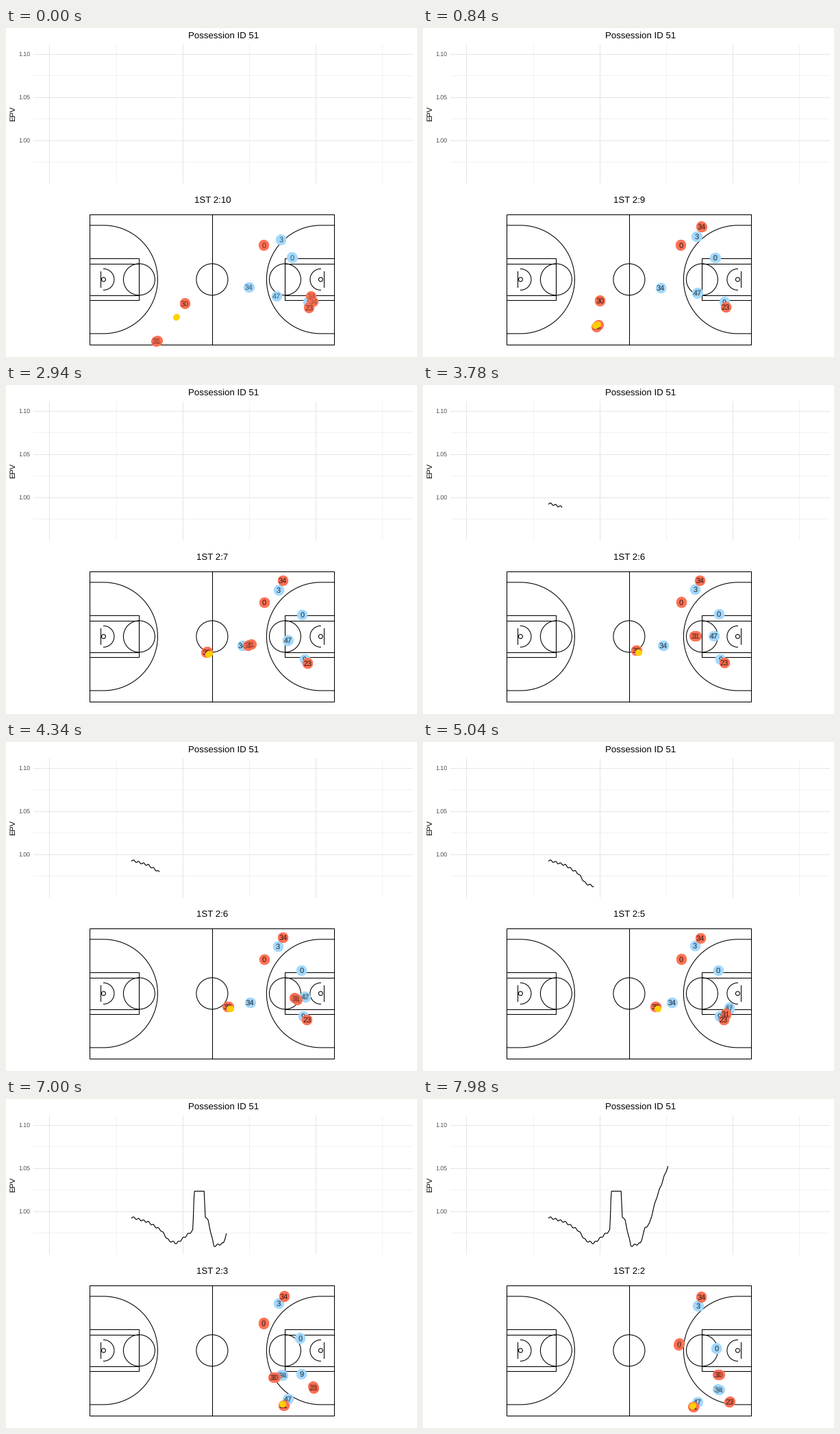
Write a matplotlib script that moves like this. It is 600 px wide and 480 px high and loops after 8000 ms.

```python
import math
import numpy as np
import matplotlib.pyplot as plt
from matplotlib.animation import FuncAnimation
from matplotlib.patches import Circle, Rectangle

W, H, DPI = 600, 480, 100
LOOP, TICK, HOLD = 8000, 40, 140   # loop, redraw interval, time one pose stays (ms)
SAMPLE = 42                        # spacing of the overlaid tracking samples (ms)
RED, BLUE, GOLD = "#FF7256", "#A3D9FF", "#FFD000"
PX = 72 / DPI

plt.rcParams["font.family"] = "Liberation Sans"
plt.rcParams["text.hinting"] = "no_hinting"
fig = plt.figure(figsize=(W / DPI, H / DPI), dpi=DPI, facecolor="white")
ax = fig.add_axes([0, 0, 1, 1])
ax.set_xlim(0.6, W + 0.6)   # half a pixel, so that lines snap to the right one
ax.set_ylim(H + 0.5, 0.5)
ax.axis("off")


def label(x, y, s, size, **kw):
    kw = {"ha": "center", "va": "baseline", "color": "black", **kw}
    return ax.text(x, y, s, fontsize=size * PX, **kw)


def line(xs, ys, width=1.07, color="black", **kw):
    return ax.plot(xs, ys, color=color, lw=width * PX, **kw)[0]


def outline(patch):
    patch.set(fill=False, edgecolor="black", linewidth=1.07 * PX, zorder=1)
    ax.add_patch(patch)


# chart: grid lines alternate between major and minor
for k in range(6):
    x, y = 64 + 97.1 * k, 38.5 + 31.4 * k
    width = 0.55 if k % 2 else 1.07
    line([x, x], [24, 226], width, "#E6E6E6", zorder=0)
    line([41, 594], [y, y], width, "#E6E6E6", zorder=0)
    if k % 2 == 0:
        label(36.4, y + 3.3, f"{1.1 - 0.025 * k:.2f}", 8.8, ha="right", color="#4D4D4D")
label(11, 125, "EPV", 11, rotation=90, va="center")
label(317.8, 15.6, "Possession ID 51", 13.2)
clock = label(301.9, 255.5, "", 13.2)

# court
MID = np.array([301.5, 367.4])
HOOP = MID + [158.5, 0]
outline(Rectangle(MID - [178.5, 95], 357, 190))
line([MID[0]] * 2, [MID[1] - 95, MID[1] + 95])
outline(Circle(MID, 23))
turn = np.linspace(-math.pi / 2, math.pi / 2, 90)
for side in (-1, 1):
    def trace(dx, dy):
        line(MID[0] + side * np.array(dx), MID[1] + np.array(dy))

    for half in (30.5, 22.7):
        trace([178.5, 106.5, 106.5, 178.5], [-half, -half, half, half])
    outline(Circle(MID + [side * 106.5, 0], 23))
    outline(Circle(MID + [side * 158.5, 0], 3))
    trace([163, 163], [-11.5, 11.5])
    trace(158.5 - 15.5 * np.cos(turn), 15.5 * np.sin(turn))
    trace([178.5, *(158.5 - 79 * np.cos(turn)), 178.5], [-79, *(79 * np.sin(turn)), 79])


def path(*keys):
    """Smooth monotone path through a few (ms, x, y) points."""
    k = np.array(keys, float)
    ts, pts = k[:, 0], k[:, 1:]
    gap = np.diff(ts)
    slope = np.diff(pts, axis=0) / gap[:, None]
    a, b = slope[:-1], slope[1:]
    inner = np.where(a * b > 0, 2 * a * b / np.where(a * b > 0, a + b, 1), 0)
    vel = np.vstack([1.5 * slope[0] - 0.5 * inner[0], inner,
                     1.5 * slope[-1] - 0.5 * inner[-1]])

    def at(t):
        i = np.clip(np.searchsorted(ts, t, side="right") - 1, 0, len(gap) - 1)
        d, u = gap[i], (t - ts[i]) / gap[i]
        v = 1 - u
        return ((1 + 2 * u) * v * v * pts[i] + u * v * v * d * vel[i]
                + (3 - 2 * u) * u * u * pts[i + 1] - u * u * v * d * vel[i + 1])
    return at


REDS = {
    "0": path((0, 377, 317), (6200, 377.3, 317), (7980, 374, 358)),
    "30": path((0, 261.5, 402), (840, 259, 398), (1960, 275, 393),
               (5040, 340, 386), (6160, 364, 407.5), (7980, 432, 402.5)),
    "31": path((0, 220.5, 457), (1960, 304, 407), (3780, 398, 366),
               (5040, 442.5, 397.5), (6160, 417, 443.5), (7980, 395.5, 449.5)),
    "34": path((0, 447.5, 395.5), (840, 407, 290), (1960, 404.5, 285), (7980, 407, 289)),
    "23": path((0, 443, 408), (6160, 439.5, 405), (7500, 453.5, 434), (7980, 448, 442)),
}


def guard(t):
    """Stays between 31 and the hoop, closing in on the runner."""
    spot = REDS["31"](t)
    return spot + (HOOP - spot) * (0.41 + 0.32 * math.cos(math.pi * t / LOOP))


BLUES = {
    "3": path((0, 402, 309), (1960, 398.5, 300.5), (6160, 397.5, 297.5), (7980, 402, 302)),
    "0": path((0, 418, 335), (1960, 433, 336), (5040, 431.5, 333.5), (7980, 429, 364)),
    "34": path((0, 355, 378.5), (1960, 342.5, 380.5), (5040, 364, 380.5), (7980, 432, 424)),
    "47": guard,
    "9": path((0, 442, 400), (5040, 433.5, 400), (7980, 431.5, 402.5)),
}


def ball_at(t):
    """The ball is held by 30 or 31, or flies between them."""
    share = np.interp(t, [0, 750, 1150, 1500, 5700, 6330], [0.33, 1, 1, 0, 0, 1])
    return ((1 - share) * (REDS["30"](t) + [3, 3])
            + share * (REDS["31"](t) + [-1.5, -1.5]))


def dots(color, diameter, z):
    return ax.scatter([], [], s=(diameter * PX) ** 2, c=color, linewidths=0, zorder=z)


class Team:
    def __init__(self, players, color, z):
        self.players = players
        self.dots = dots(color, 15.2, z)
        self.tags = {n: [label(0, 0, n, 11, alpha=0.35, zorder=z + 1) for _ in range(3)]
                     for n in players}

    def move(self, times):
        spots = []
        for n, at in self.players.items():
            here = [at(t) for t in times]
            spots += here
            for k, tag in enumerate(self.tags[n]):
                tag.set_visible(k < len(here))
                if k < len(here):
                    tag.set_position((here[k][0], here[k][1] + 4))
        self.dots.set_offsets(spots)


teams = [Team(BLUES, BLUE, 3), Team(REDS, RED, 5)]
ball = dots(GOLD, 9, 8)

# expected value: a rough course with a ripple, flat while the ball is passed
COURSE = np.array([
    (184, 173), (208, 180), (227, 192), (238, 207), (250, 211), (273.5, 192),
    (275.3, 135), (290, 135), (291.3, 171), (296, 179), (304, 215), (318, 211),
    (325, 188), (331, 183), (341, 146), (358, 99)])
epv_x = np.linspace(184, 358, 200)
epv_y = np.interp(epv_x, *COURSE.T)
epv_y -= np.where(epv_y == 135, 0, 1.3 * np.cos(2 * math.pi * (epv_x - 187) / 7.2))
curve = line([], [], 1.15, zorder=2)


def draw(i):
    step = int((i * TICK + TICK / 2) // HOLD)
    t = step * HOLD
    offsets = (-1, 0, 1) if step else (-0.5, 0.5)
    times = [t + SAMPLE * o for o in offsets]
    for team in teams:
        team.move(times)
    ball.set_offsets([ball_at(s) for s in times])

    shown = epv_x <= 184 + 36.85 * (t - 3237) / 1000
    curve.set_data(epv_x[shown], epv_y[shown])
    clock.set_text(f"1ST 2:{2 + math.ceil((7980 - t) / 1053)}")
    return []


anim = FuncAnimation(fig, draw, frames=LOOP // TICK, interval=TICK,
                     init_func=lambda: draw(0), repeat=True, repeat_delay=0)
plt.show()
```
